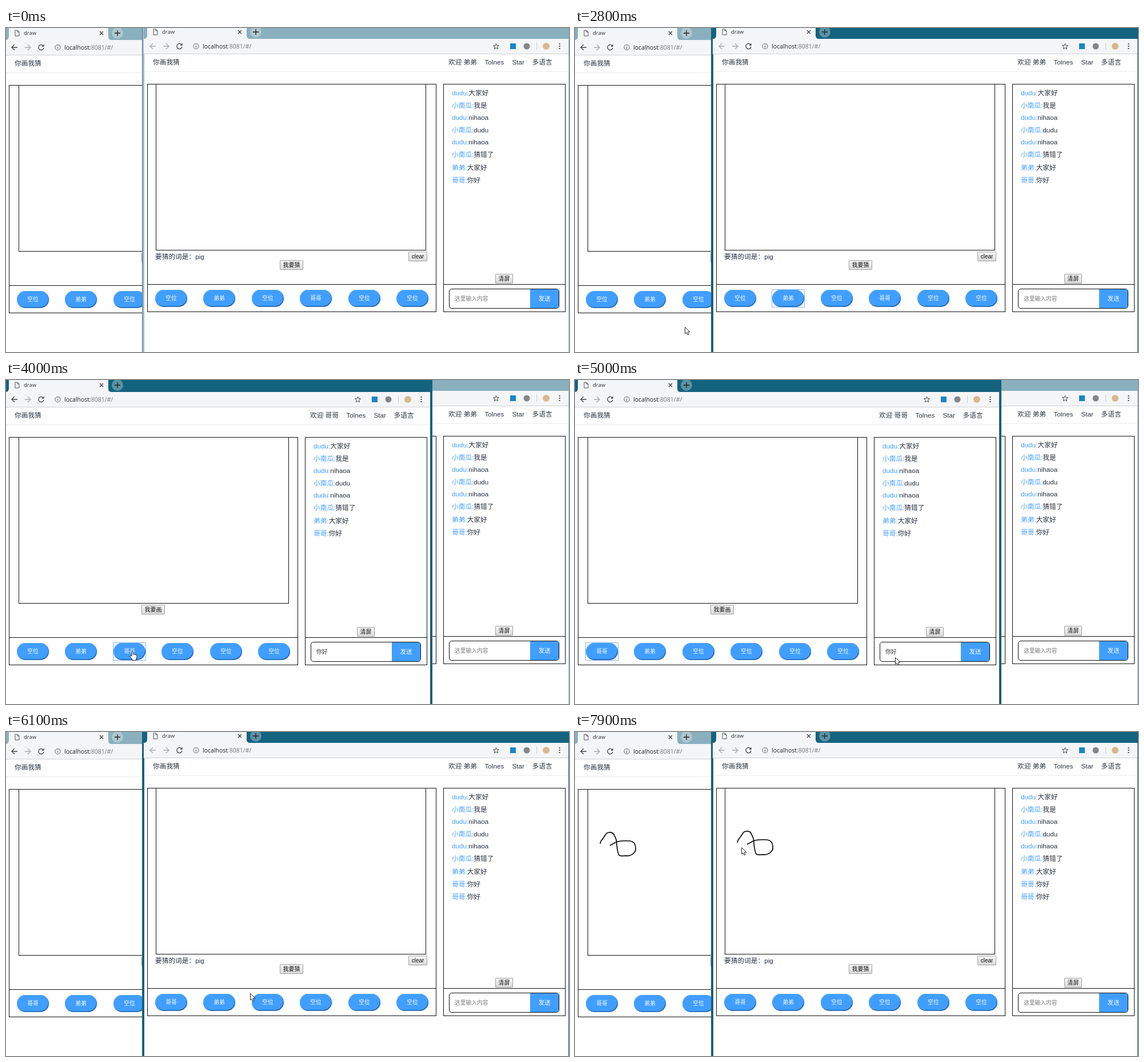
Animation, 985 px wide and 568 px high, one loop 8 s. Source, as an HTML page:

```html
<!DOCTYPE html>
<html lang="zh">
<head>
<meta charset="utf-8">
<title>draw</title>
<style>
html, body { margin: 0; width: 100%; height: 100%; overflow: hidden; background: #fff; }
body {
  position: relative;
  font: 11.7px/16px "Liberation Sans", "Noto Sans CJK SC", "Noto Sans CJK JP", sans-serif;
  color: #2c3440;
}
body * { position: absolute; box-sizing: border-box; white-space: nowrap; }
svg { overflow: visible; }
svg *, span span, b { position: static; }
.win {
  --bar: #8ab0be;
  left: 0; top: 0; width: 742px; height: 580px; background: #fff;
  box-shadow: 0 0 0 3px #9dbcc8, 0 0 0 4px #566f7a;
}
.win.active { --bar: #13627e; box-shadow: 0 0 0 4px #1b6079; }
#right { left: 242px; top: -2px; }
.bar { left: -1px; top: 0; width: 744px; height: 21px; background: var(--bar); }
.tools { left: -1px; top: 21px; width: 743px; height: 27px; background: #f4f5f6; border-bottom: 1px solid #cfd2d4; }
.tab { left: 31px; top: 1px; font: 9.5px/16px "Open Sans", "Noto Sans", sans-serif; color: #333; }
.url { left: 102px; top: 26px; font: 10.5px/16px "Open Sans", "Noto Sans", sans-serif; color: #777; }
.url b { font-weight: 400; color: #222; }
.nav { left: 0; top: 78px; width: 742px; height: 1px; background: #ececec; }
.box { border: 1px solid #111; }
.game { left: 5px; top: 100px; width: 506px; height: 400px; }
.chat { left: 523px; top: 100px; width: 214px; height: 400px; }
.rule { left: 0; right: 0; top: 350px; height: 1px; background: #111; }
.pad { left: 22px; top: 100px; width: 473px; height: 292px; }
#right .pad { left: 20px; }
.pad svg { left: -1px; top: -1px; }
.name { color: #409eff; }
.btn {
  height: 17px; border: 1px solid #a0a0a0; border-radius: 1px; color: #111;
  background: linear-gradient(#f6f6f6, #dcdcdc); font-size: 10px; line-height: 15px; text-align: center;
}
.seat {
  top: 461px; width: 56px; height: 30px; border-radius: 15px; background: #409eff;
  box-shadow: inset -1px -1.5px 0 #2565ad, inset 1px 1px 0 #55a6f8;
  color: #fff; font-size: 9.75px; line-height: 30px; text-align: center;
}
.seat.focus::after { content: ""; position: absolute; inset: -1px; border: 1px solid #86b4f2; }
.field {
  left: 533px; top: 459px; width: 193px; height: 35px; border: 1px solid #111; border-radius: 5px;
  overflow: hidden; font-size: 9.75px; line-height: 33px; color: #777;
}
.field span { left: 9px; top: 0; }
.field .filled { color: #333; }
.send { right: 0; top: 0; width: 50px; height: 33px; background: #409eff; color: #fff; font-size: 10.5px; text-align: center; }
.send.hover { background: #66b1ff; }
#cursor { left: 0; top: 0; z-index: 9; }
</style>
</head>
<body>
<div class="win" id="left"></div>
<div class="win" id="right"></div>
<svg id="cursor" width="14" height="20" fill="#fff" stroke="#222">
  <path id="arrow" d="M.5 .5V12L3 10L5 14L7 13L5 9H9Z"/>
  <path id="hand" d="M-1 9V2Q0-1 1.500 2V6Q3 5 4 6Q5 5 6 7Q8 6 8 8V11L6.500 15V16.500H0V15L-4 10Q-4 7-1 9Z"/>
</svg>
<script>
const $ = (sel, root = document) => root.querySelector(sel);
const text = (x, y, s, cls = '') => `<span class="${cls}" style="left:${x}px;top:${y - 8}px">${s}</span>`;
const button = (x, y, w, s) => `<div class="btn" style="left:${x}px;top:${y}px;width:${w}px">${s}</div>`;

const LOOP = 8000, STEP = 100;
const EMPTY = '空位', SIT = '坐下', YOUNG = '弟弟', OLD = '哥哥';
const SENT_AT = 52;
const seatX = i => Math.round(19 + 84.4 * i);

const chat = [
  ['dudu', '大家好'], ['小南瓜', '我是'], ['dudu', 'nihaoa'], ['小南瓜', 'dudu'], ['dudu', 'nihaoa'],
  ['小南瓜', '猜错了'], [YOUNG, '大家好'], [OLD, '你好'], [OLD, '你好']
];
// Lines that hold only Latin text are two pixels lower in height
let lineY = 116;
const chatY = chat.map(line => {
  const y = lineY;
  lineY += y > 130 && /^小/.test(line[0]) && y < 190 ? 20.5 : 22.4;
  return y;
});

const star = Array.from({ length: 10 }, (_, i) => {
  const r = i % 2 ? 2.4 : 5.3, a = i * Math.PI / 5;
  return [615.5 + r * Math.sin(a), 34.5 - r * Math.cos(a)].map(v => v.toFixed(1));
}).join(' ');
const backArrow = (x, color, flip = 1) =>
  `<path d="M5 0H-5L0-5M-5 0L0 5" transform="translate(${x} 34) scale(${flip} 1)" stroke="${color}"/>`;
const dot = (x, r, color) => `<circle cx="${x}" cy="34" r="${r}" fill="${color}" stroke="none"/>`;

function icons(back) {
  return `<svg width="742" height="48" fill="none" stroke="#444" stroke-width="1.3">
    <path d="M-1 21Q5 21 5 15V0H179V15Q179 21 185 21Z" fill="#f4f5f6" stroke="none"/>
    <circle cx="195" cy="9" r="10" fill="#fff" fill-opacity=".3" stroke="none"/>
    <path d="M190 9h10M195 4v10" stroke="#222"/>
    <path d="M16 4h4l3 3v7h-7zM20 4v3h3" stroke="#555" stroke-width="1"/>
    <path d="M164 6l6 6m0-6l-6 6"/>
    ${backArrow(15, back)}${backArrow(38, '#aaa', -1)}
    <path d="M65 31a4.600 4.600 0 1 0 1 4M66 29v3H63"/>
    <circle cx="90.5" cy="34" r="4.7" stroke="#666" stroke-width="1"/>
    <path d="M90.5 31v5.500" stroke="#666" stroke-dasharray="1.2 1.3 3"/>
    <polygon points="${star}" stroke-width="1"/>
    <rect x="640" y="29" width="10" height="10" fill="#1c84c6" stroke="none"/>
    ${dot(669, 5.5, '#858585')}${dot(703, 6, '#d5b98c')}
    <path d="M686.5 28v12" stroke="#ccc" stroke-width="1"/>
    <path d="M726.5 29v10" stroke-width="2" stroke-dasharray="2"/>
  </svg>`;
}

function build(win, user, isDrawer) {
  win.innerHTML = `<div class="bar"></div><div class="tools"></div>${icons(isDrawer ? '#aaa' : '#444')}
    <span class="tab">draw</span><span class="url"><b>localhost</b>:8081/#/</span><div class="nav"></div>`
    + text(15, 62, '你画我猜') + text(532, 62, '欢迎 ' + user)
    + text(595.5, 62, 'Tolnes') + text(643.5, 62, 'Star') + text(678.5, 62, '多语言')
    + `<div class="box game"><div class="rule"></div></div>
    <div class="box chat"><div class="rule"></div></div>
    <div class="box pad"><svg width="473" height="292"><path class="ink" fill="none" stroke="#000" stroke-width="1.6" stroke-linejoin="round"/></svg></div>`
    + (isDrawer
      ? text(19, 403, '要猜的词是：pig') + button(462, 394, 33, 'clear') + button(237, 409, 41, '我要猜')
      : button(237, 394, 41, '我要画'))
    + chat.map(([name, msg], i) => text(538, chatY[i], `<span class="name">${name}:</span>${msg}`, 'msg')).join('')
    + button(614, 433, 31, '清屏')
    + `<div class="field"><span class="entry">这里输入内容</span><div class="send">发送</div></div>`
    + chat.slice(0, 6).map((_, i) => `<div class="seat" style="left:${seatX(i)}px"></div>`).join('');
  return {
    el: win, seats: [...win.querySelectorAll('.seat')], ink: $('.ink', win),
    last: [...win.querySelectorAll('.msg')].pop(), send: $('.send', win), entry: $('.entry', win)
  };
}

const left = build($('#left'), OLD, false);
const right = build($('#right'), YOUNG, true);

// One piece of the stroke per step
const INK_FROM = 69;
const ink = ['L23 92L28 85', 'L32 79', 'L34 77L38 76', 'Q45 75 47 82', 'Q51 88 51 97', 'Q52 110 55 116',
  'Q58 118 65 117', 'Q75 118 80 113', 'Q85 109 84 102', 'Q83 92 74 91', 'Q58 90 50 93L39 99'];

// Pointer hot spot: step, x, y
const path = [
  [3, 773, 199], [4, 734, 214], [5, 734, 214], [6, 577, 345], [8, 394, 422], [9, 338, 450],
  [11, 298, 473], [14, 298, 473], [17, 391, 471], [24, 391, 471], [26, 316, 498], [28, 192, 524],
  [30, 192, 524], [32, 317, 506], [33, 324, 486], [37, 78, 484], [39, 221, 475], [42, 221, 475],
  [45, 48, 476], [47, 48, 476], [50, 560, 486], [51, 694, 473], [52, 694, 473], [53, 753, 513],
  [55, 833, 529], [56, 833, 529], [58, 646, 523], [60, 514, 491], [62, 340, 424], [63, 341, 331],
  [65, 285, 199], [66, 284, 195], [68, 284, 195], [79, 291, 202]
];

function pointer(k) {
  if (k >= INK_FROM && k < 79) {
    const [x, y] = ink[k - INK_FROM].match(/\d+/g).slice(-2);
    return [+x + 263, +y + 98];
  }
  const i = path.findIndex(p => p[0] >= k);
  const b = path[i], a = path[Math.max(0, i - 1)];
  const f = b === a ? 0 : (k - a[0]) / (b[0] - a[0]);
  return [1, 2].map(n => Math.round(a[n] + (b[n] - a[n]) * f));
}

function draw(k) {
  const top = k >= 29 && k < 55 ? left : right;
  const [x, y] = pointer(k);
  const px = x - (top === right ? 242 : 0), py = y + (top === right ? 2 : 0);
  const inside = (x0, y0, w, h) => k >= 3 && px >= x0 && px < x0 + w && py >= y0 && py < y0 + h;

  const taken = Array(6).fill(EMPTY);
  taken[k >= 13 && k < 19 ? 0 : 1] = YOUNG;
  taken[k < 40 ? 3 : k < 46 ? 2 : 0] = OLD;
  const focus = top === right
    ? (k < 12 || k >= 55 ? -1 : k < 19 ? 0 : 1)
    : (k < 40 || k >= SENT_AT ? -1 : k < 46 ? 2 : 0);
  const stroke = k < INK_FROM ? '' : 'M22 96' + ink.slice(0, k - INK_FROM + 1).join('');
  let hand = false;

  for (const w of [left, right]) {
    const onTop = w === top;
    w.el.style.zIndex = onTop ? 2 : 1;
    w.el.classList.toggle('active', onTop && k >= 12 && k !== 29 && k !== 55);
    w.seats.forEach((seat, i) => {
      const hover = onTop && inside(seatX(i), 461, 56, 30);
      hand = hand || hover;
      seat.textContent = hover && taken[i] === EMPTY ? SIT : taken[i];
      seat.classList.toggle('focus', onTop && focus === i);
    });
    const onSend = onTop && inside(675, 459, 51, 35);
    hand = hand || onSend;
    w.send.classList.toggle('hover', onSend);
    w.last.style.display = k >= SENT_AT ? '' : 'none';
    w.ink.setAttribute('d', stroke);
  }
  const typed = k < SENT_AT;
  left.entry.textContent = typed ? '你好' : '这里输入内容';
  left.entry.classList.toggle('filled', typed);

  const cursor = $('#cursor');
  cursor.style.display = k < 3 ? 'none' : '';
  cursor.style.transform = `translate(${x}px,${y}px)`;
  $('#arrow').style.display = hand ? 'none' : '';
  $('#hand').style.display = hand ? '' : 'none';
}

let shown = -1;
function tick() {
  const k = Math.floor(performance.now() % LOOP / STEP);
  if (k !== shown) draw(shown = k);
  requestAnimationFrame(tick);
}
tick();
</script>
</body>
</html>
```
